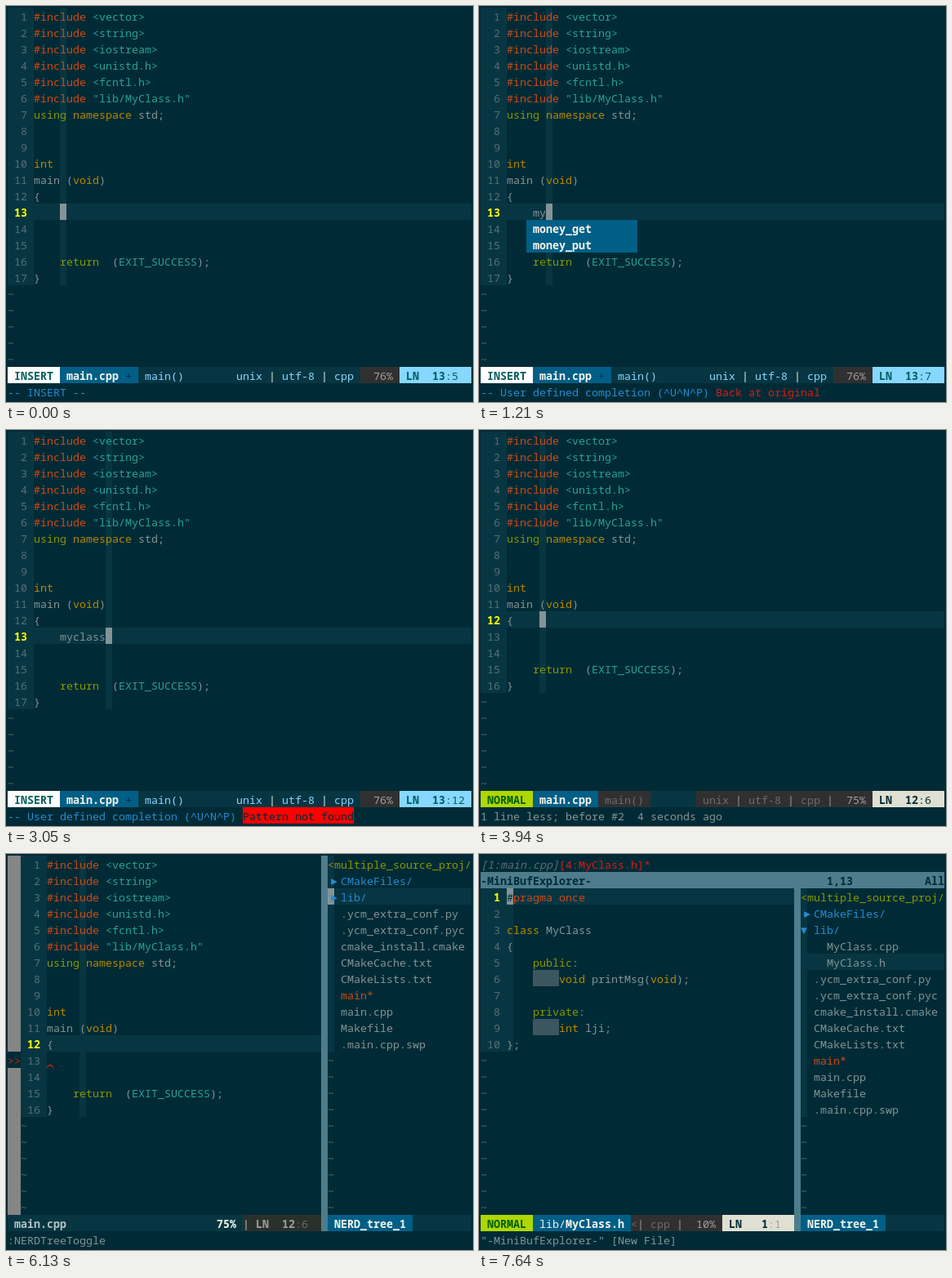
Recreate the animation shown at these times as an HTML page. Size 572x485 px, loop 8000 ms.

```html
<!DOCTYPE html>
<html lang="en">
<head>
<meta charset="utf-8">
<title>Editor session</title>
<style>
html, body { margin: 0; width: 100%; height: 100%; overflow: hidden; background: #002b36; }
.screen { position: absolute; left: 2px; top: 2px; width: 568px; height: 480px; visibility: hidden; }
.screen.on { visibility: visible; }
.screen > * { position: absolute; }
.screen span {
  font: 13.3333px/22px "Noto Sans Mono", "DejaVu Sans Mono", monospace;
  font-variant-ligatures: none;
  height: 20px; white-space: pre; color: #839496;
}
.screen .B { font-weight: bold; }
.screen .I { font-style: italic; }
.screen .o { color: #cb4b16; }
.screen .c { color: #2aa198; }
.screen .g { color: #859900; }
.screen .y { color: #b58900; }
.screen .b { color: #268bd2; }
.screen .r { color: #dc1a10; }
.screen .n { color: #586e75; }
.screen .Y { color: #ffff00; }
.screen .w { color: #f4f4ea; }
.screen .t { color: #005f5f; }
.screen .s { color: #87d7ff; }
.screen .d { color: #6c6c6c; }
.screen .h { color: #9e9e9e; }
.screen .k { color: #002b36; }
.screen .v { color: #005f00; }
.screen .l { color: #b4c2c2; }
</style>
</head>
<body>
<script>
const CW = 8, CH = 20, COLS = 71, LAST = 21, BAR = 22, CMD = 23;
const LOOP = 8000;
const BASE = '#002b36', SOFT = '#073642', CURSOR = '#839496', BLUE = '#005f87',
      DARK = '#303030', STEEL = '#4d7d8c', SIGN = '#858585';
let page;

function box(col, row, w, h, color) {
  const el = document.createElement('div');
  el.style.cssText = `left:${col * CW}px;top:${row * CH}px;width:${w * CW}px;height:${h * CH}px;background:${color}`;
  page.append(el);
}

// "§ab;" switches the following run to classes a and b
function text(col, row, str) {
  const parts = ('§p;' + str).split(/§(\w+);/);
  for (let i = 1; i < parts.length; i += 2) {
    const run = parts[i + 1];
    if (!run) continue;
    const el = document.createElement('span');
    el.className = [...parts[i]].join(' ');
    el.textContent = run;
    el.style.left = col * CW + 'px';
    el.style.top = row * CH + 'px';
    page.append(el);
    col += run.length;
  }
}

function seg(col, w, color, str, row = BAR) {
  box(col, row, w, 1, color);
  text(col, row, str);
}

const cursor = (col, row) => box(col, row, 1, 1, CURSOR);
const cmd = str => text(0, CMD, str);

function buffer(lines, line, col, { x = 0, y = 0, right = COLS } = {}) {
  box(x, y, 4, lines.length, SOFT);
  box(x + 3 + col, y, 1, lines.length, SOFT);
  box(x + 4, y + line - 1, right - x - 4, 1, SOFT);
  lines.forEach((str, i) => {
    const mark = i + 1 === line ? '§YB;' : '§n;';
    text(x, y + i, mark + String(i + 1).padStart(3));
    text(x + 4, y + i, str);
  });
  for (let r = y + lines.length; r <= LAST; r++) text(x, r, '§n;~');
}

const include = name => '§o;#include §c;' + name;
const program = body => [
  ...['<vector>', '<string>', '<iostream>', '<unistd.h>', '<fcntl.h>', '"lib/MyClass.h"'].map(include),
  '§g;using §y;namespace§p; std;', '', '',
  '§y;int', 'main (§y;void§p;)', '{', ...body, '', '',
  '    §g;return§p;  (§c;EXIT_SUCCESS§p;);', '}'
];

const header = [
  '§o;#pragma once', '', '§y;class§p; MyClass', '{',
  '    §g;public§p;:', '        §y;void§p; printMsg(§y;void§p;);', '',
  '    §g;private§p;:', '        §y;int§p; lji;', '};'
];

function normalBar(name, width, pos, percent) {
  box(0, BAR, COLS, 1, SOFT);
  seg(0, 8, '#afd700', '§vB; NORMAL');
  seg(8, width, BLUE, name);
  seg(8 + width, 8, DARK, '§d; main()');
  seg(33, 27, DARK, `§d; unix §h;|§d; utf-8 §h;|§d; cpp §h;|  ${percent}`);
  seg(60, 11, '#e0e0d2', `§kB; LN  ${pos[0]}§k;:${pos[1]}`);
}

function insertBar(col) {
  seg(0, 8, '#ffffff', '§tB; INSERT');
  seg(8, 12, BLUE, '§wB; main.cpp §k;+');
  seg(20, 34, SOFT, '§s; main()        unix §w;|§s; utf-8 §w;|§s; cpp');
  seg(54, 6, DARK, '§h;  76%');
  seg(60, 11, '#87d7ff', `§tB; LN  13§t;:${col}`);
}

function popup(items, row, w) {
  box(7, row, w, items.length, BLUE);
  items.forEach((it, i) => text(8, row + i, '§wB;' + it));
}

const USER = '§b;-- User defined completion (^U^N^P) ';
const BACK = USER + '§r;Back at original';
const INSERT = '§b;-- INSERT --';
const words = ['map', 'main', 'mega', 'match', 'micro', 'milli', 'minus', 'mutex', 'modulus', 'mutable',
  'map     <snip> (map)', 'lorem   <snip> (lorem) "Lorem Ipsum - 50 Words"'];

const typing = (word, msg, menu) => () => {
  const col = word.length + 5;
  buffer(program(['    ' + word]), 13, col);
  cursor(3 + col, 12);
  insertBar(col);
  if (menu) menu();
  if (msg === 'missing') {
    box(36, CMD, 17, 1, '#ff0000');
    cmd(USER + '§k;Pattern not found');
  } else cmd(msg);
};

const escaped = () => {
  buffer(program(['    myclass']), 13, 11);
  cursor(14, 12);
  text(14, 12, '§k;s');
  normalBar('§wB; main.cpp §k;+', 12, [13, 11], '76%');
};

function signs() {
  box(0, 0, 2, 12, SIGN);
  box(0, 13, 2, 9, SIGN);
  text(0, 12, '§r;>>');
  page.insertAdjacentHTML('beforeend',
    '<svg style="left:48px;top:254px" width="8" height="6"><path d="M0 5l4-3 4 3" fill="none" stroke="#dc1a10" stroke-width="1.3"/></svg>');
}

const undone = (signed, msg, inCmd) => () => {
  const x = signed ? 2 : 0;
  buffer(program([]), 12, 6, { x });
  if (signed) signs();
  normalBar('§wB; main.cpp', 10, [12, 6], '75%');
  if (inCmd) cursor(0, CMD); else cursor(x + 9, 11);
  cmd(msg);
};

const files = ['.ycm_extra_conf.py', '.ycm_extra_conf.pyc', 'cmake_install.cmake', 'CMakeCache.txt',
  'CMakeLists.txt', '§o;main*', 'main.cpp', 'Makefile', '.main.cpp.swp'];

function tree(line, open, y, focus) {
  const rows = [
    '§y;<§g;multiple_source_proj/',
    '§b;▶§b; CMakeFiles/',
    `§b;${open ? '▼' : '▶'}§b; lib/`,
    ...(open ? ['    MyClass.cpp', '    MyClass.h'] : []),
    ...files.map(f => '  ' + f)
  ];
  box(49, y, 1, rows.length, SOFT);
  box(49, y + line, 22, 1, SOFT);
  if (focus) cursor(49, y + line);
  rows.forEach((str, i) => text(49, y + i, str));
  for (let r = y + rows.length; r <= LAST; r++) text(49, r, '§n;~');
}

function treeFrame(y) {
  box(48, y, 1, BAR + 1 - y, STEEL);
  seg(49, 13, BLUE, '§wB; NERD_tree_1');
  box(62, BAR, 9, 1, SOFT);
}

const browsing = (line, open) => () => {
  buffer(program([]), 12, 6, { x: 2, right: 48 });
  signs();
  seg(0, 48, SOFT, '§lB; main.cpp');
  text(32, BAR, '§wB;75%');
  seg(36, 12, '#2a302c', '§l;| §hB;LN  12§d;:6');
  treeFrame(0);
  if (line < 0) cursor(49, 0);
  else tree(line, open, 0, true);
  cmd(':NERDTreeToggle');
};

const viewing = (y, list, msg) => () => {
  if (y) {
    if (list) text(0, 0, '§nI;[1:main.cpp]§r;[4:MyClass.h]*');
    seg(0, COLS, STEEL, '§kB;-MiniBufExplorer-', 1);
    text(53, 1, '§kB;1,13           All');
  }
  buffer(header, 1, 1, { y, right: 48 });
  for (const r of [5, 8]) box(8, y + r, 4, 1, '#3b565e');
  cursor(4, y);
  text(4, y, '§k;#');
  seg(0, 8, '#afd700', '§vB; NORMAL');
  seg(8, 15, BLUE, '§w; lib/§wB;MyClass.h');
  seg(23, 14, DARK, '§d;<§h;|§d; cpp §h;|  10%');
  seg(37, 11, '#e0e0d2', '§kB; LN   1§h;:1');
  treeFrame(y);
  tree(4, true, y, false);
  cmd(msg);
};

const opened = '"lib/MyClass.h" 10L, 111C';
const undoMsg = '1 line less; before #2  4 seconds ago';
const fullMenu = () => popup(words, 0, 49);
const smallMenu = () => popup(['money_get', 'money_put'], 13, 17);

const timeline = [
  [0, typing('', INSERT)],
  [750, typing('m', INSERT)],
  [790, typing('m', BACK, fullMenu)],
  [1170, typing('my', BACK)],
  [1210, typing('my', BACK, smallMenu)],
  [2090, typing('myc', 'missing')],
  [2400, typing('mycl', '')],
  [2440, typing('mycl', 'missing')],
  [2580, typing('mycla', '')],
  [2620, typing('mycla', 'missing')],
  [2840, typing('myclas', '')],
  [2880, typing('myclas', 'missing')],
  [3010, typing('myclass', '')],
  [3050, typing('myclass', 'missing')],
  [3500, typing('myclass', '')],
  [3550, escaped],
  [3940, undone(false, undoMsg)],
  [3980, undone(true, undoMsg)],
  [5230, undone(true, ':NERDTreeToggle', true)],
  [5320, browsing(-1)],
  [5370, browsing(0, false)],
  [5750, browsing(1, false)],
  [6130, browsing(2, false)],
  [6510, browsing(2, true)],
  [6880, browsing(3, true)],
  [7080, browsing(4, true)],
  [7470, viewing(0, false, opened)],
  [7530, viewing(2, false, opened)],
  [7640, viewing(2, true, '"-MiniBufExplorer-" [New File]')]
];

const screens = timeline.map(([start, draw]) => {
  page = document.createElement('div');
  page.className = 'screen';
  draw();
  document.body.append(page);
  return { start, el: page };
});

const t0 = performance.now();
let shown;

function tick() {
  const t = (performance.now() - t0) % LOOP;
  const now = screens.findLast(s => s.start <= t) || screens[0];
  if (now !== shown) {
    if (shown) shown.el.classList.remove('on');
    now.el.classList.add('on');
    shown = now;
  }
  requestAnimationFrame(tick);
}
tick();
</script>
</body>
</html>
```
